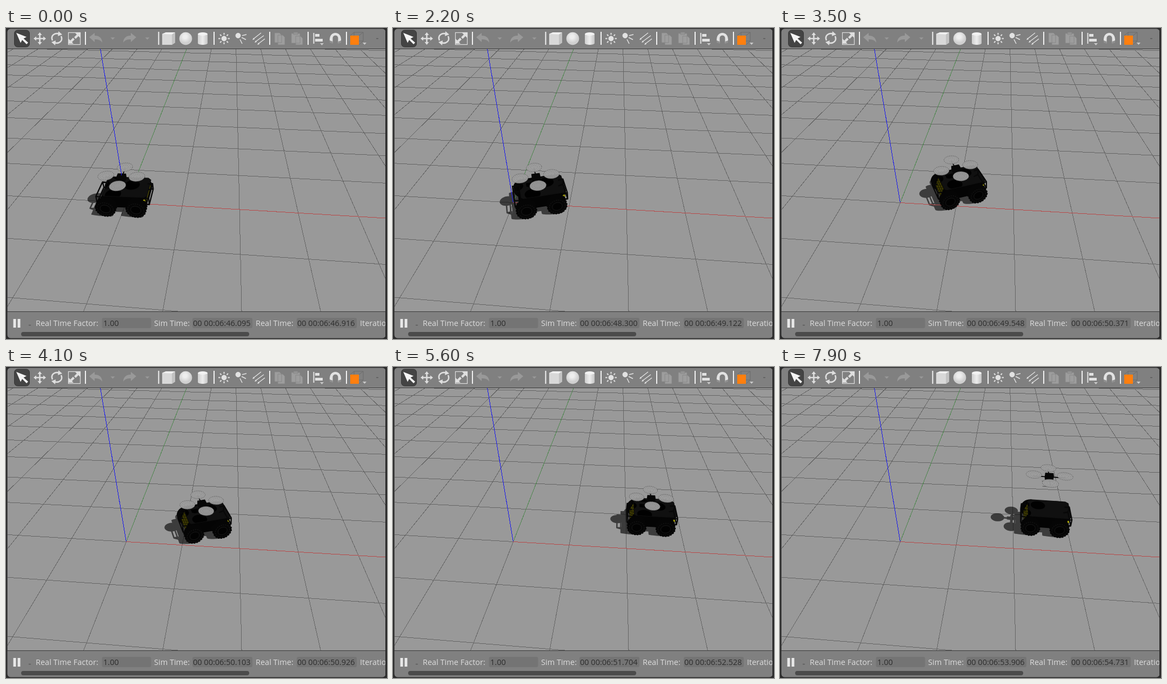
These frames come from a looping animation (705x574 px, 8000 ms). An HTML page:

```html
<!DOCTYPE html>
<html lang="en">
<head>
<meta charset="utf-8">
<title>Rover and drone simulation</title>
<style>
  html, body { margin: 0; width: 100%; height: 100%; overflow: hidden; background: #2b2b2b; }
  svg { display: block; width: 705px; height: 574px; }
  text { font: 14.5px "Open Sans", "Noto Sans", sans-serif; fill: #dcdcdc; white-space: pre; }
  .value { fill: #2d2d2d; }
</style>
</head>
<body>
<svg viewBox="0 0 705 574">
  <defs>
    <clipPath id="view"><rect x="3" y="39" width="699" height="484"/></clipPath>
    <clipPath id="deck"><path id="deckClip"/></clipPath>
    <radialGradient id="ball" cx=".45" cy=".35"><stop offset=".3" stop-color="#eee"/><stop offset="1" stop-color="#cfcfcf"/></radialGradient>
    <linearGradient id="tube"><stop offset="0" stop-color="#cfcfcf"/><stop offset=".5" stop-color="#ececec"/><stop offset="1" stop-color="#c4c4c4"/></linearGradient>
  </defs>

  <rect width="705" height="574" fill="#2b2b2b"/>
  <rect x="2.5" y="1.5" width="700" height="571" rx="6" fill="#808080"/>
  <rect x="3" y="39" width="699" height="484" fill="#999"/>
  <g id="scene" clip-path="url(#view)"></g>
  <path d="M2 38.5H703M2 523.5H703" stroke="#3a3a3a"/>

  <!-- toolbar -->
  <rect x="15.5" y="4" width="28" height="31" rx="6" fill="#444" stroke="#353535"/>
  <path d="M19 9L38 16.500L32.500 19.500L41 27L38 30L30 22L27 27.500Z" fill="#f4f4f4"/>
  <g fill="#dedede">
    <path d="M62.500 8l4 5h-2.700v5.200h5.200v-2.700l5 4-5 4v-2.700h-5.200v5.200h2.700l-4 5-4-5h2.700v-5.200h-5.200v2.700l-5-4 5-4v2.700h5.200v-5.200h-2.700z"/>
    <path d="M97 6l7 6-8 3zM91 32l-7-6 8-3z"/>
    <path d="M128 9h9v9l-3-3-5 5-3-3 5-5zM125 29h-9v-9l3 3 5-5 3 3-5 5z"/>
  </g>
  <g fill="none" stroke="#dedede" stroke-width="2">
    <path d="M86 23C82 14 90 8 99 11M102 15C106 24 98 30 89 27" stroke-width="2.600"/>
    <rect x="115.500" y="8.500" width="22" height="22" stroke-width="1.200"/>
  </g>
  <path d="M147 7V31M282.500 7V31M385 7V31M488 7V31M559 7V31M630 7V31" stroke="#f2f2f2" stroke-width="2"/>
  <g fill="#999">
    <path d="M154 17l10-8v5c8 0 14 4 14 13-3-5-7-6-14-6v5z"/>
    <path d="M241 17l-10-8v5c-8 0-14 4-14 13 3-5 7-6 14-6v5z"/>
    <path d="M193.500 17.500h8l-4 4zM257.500 17.500h8l-4 4z"/>
  </g>
  <path d="M289 11l7-3h17v19l-6 4h-18z" fill="#d8d8d8"/>
  <path d="M289 11l7-3h17l-6 4z" fill="#f0f0f0"/>
  <path d="M307 12l6-4v19l-6 4z" fill="#c2c2c2"/>
  <circle cx="332.500" cy="19.500" r="11.800" fill="url(#ball)"/>
  <path d="M355 11v17c0 4 18 4 18 0v-17z" fill="url(#tube)"/>
  <ellipse cx="364" cy="11" rx="9" ry="3" fill="#f2f2f2"/>
  <g fill="#e2e2e2" stroke="#e2e2e2">
    <circle cx="403.500" cy="19.500" r="4.500"/>
    <path id="rays" stroke-width="2" fill="none"/>
    <circle cx="429.500" cy="14" r="4.500"/>
    <path d="M437 14l8-2M436 17.500l8 4M433 21l4 8" stroke-width="1.500"/>
    <path d="M458 20L472 9M462 25L477 14M467 29L479 20" stroke-width="1.400"/>
    <path d="M456 22l2-4 2 3zM460 27l2-4 2 3zM465 31l2-4 2 3z" stroke="none"/>
  </g>
  <g fill="#9d9d9d" stroke="#838383" stroke-width=".8">
    <path d="M497 9h9l4 4v14h-13zM503 13h9l4 4v14h-13z"/>
    <path d="M528 10h16v18h-16zM532 8h8v4h-8zM536 15h9l4 4v12h-13z"/>
  </g>
  <g fill="#e2e2e2">
    <path d="M568.500 9h2v20h-2zM572 11h8v5h-8zM572 20h14v5h-14z"/>
    <path d="M581 28h7l-3.500 4zM660 27h7l-3.500 4z" opacity=".75"/>
    <path d="M599 24C597 4 622 4 620 24L614.500 28V19C614.500 12 604.500 12 604.500 19V28Z"/>
  </g>
  <path d="M599 23l5.500 2v4l-5.500-2zM620 23l-5.500 2v4l5.500-2z" fill="#8f8f8f"/>
  <path d="M637 14l7-6h17v16l-8 7M653 14l8-6M644 8v6M653 24h8" fill="none" stroke="#6a6a6a" stroke-width=".9"/>
  <rect x="637" y="14" width="16" height="17" fill="#ff7f0e"/>
  <path d="M685 19.500h4" stroke="#5a5a5a" stroke-width="1.500"/>

  <!-- status bar -->
  <path d="M13.500 537h5v16h-5zM21.500 537h5v16h-5z" fill="#e8e8e8"/>
  <path d="M42 548.500h4" stroke="#5a5a5a" stroke-width="1.500"/>
  <g fill="#747474">
    <rect x="177.500" y="535" width="91" height="19" rx="3"/>
    <rect x="345" y="535" width="111" height="19" rx="3"/>
    <rect x="538" y="535" width="111" height="19" rx="3"/>
  </g>
  <text x="55" y="550">Real Time Factor:</text>
  <text x="180" y="550" class="value">1.00</text>
  <text x="274" y="550">Sim Time:</text>
  <text x="346" y="550" class="value" id="sim"></text>
  <text x="462" y="550">Real Time:</text>
  <text x="539" y="550" class="value" id="real"></text>
  <text x="655" y="550">Iterations:</text>
  <rect x="28" y="561" width="422" height="8" rx="4" fill="#4b4b4b"/>
  <path d="M702 6V568h3V6z" fill="#2b2b2b"/>
</svg>
<script>
const $ = id => document.getElementById(id);
const LOOP = 8000;

// time, x, y, heading in degrees
const drive = [
  [300, .007, -.02, 2], [1200, .1, -.02, 2], [1600, .265, -.023, 2], [2100, .442, .007, 17],
  [2800, .695, .16, 29.9], [3000, .75, .193, 29.5], [3900, 1.205, .433, 22], [4100, 1.335, .482, 20.3],
  [4800, 1.96, .671, 14.5], [4900, 2.028, .69, 13.7], [5600, 2.432, .729, -.2],
  [5700, 2.485, .727, -.8], [6600, 2.561, .716, -1.85]
];
// time, simulated ms, lead of the real clock
const clock = [
  [0, 46095, 821], [200, 46195, 821], [300, 46195, 821], [1600, 47698, 821], [2800, 48901, 822],
  [4100, 50103, 823], [4900, 50903, 824], [5600, 51704, 824], [7000, 53106, 825], [7900, 53906, 825]
];

function sample(rows, t) {
  const i = rows.findIndex(r => r[0] >= t);
  if (i < 0) return rows[rows.length - 1];
  if (i === 0) return rows[0];
  const a = rows[i - 1], b = rows[i], u = (t - a[0]) / (b[0] - a[0]);
  return a.map((v, k) => v + (b[k] - v) * u);
}

// perspective camera, world metres to pixels
function project([x, y, z]) {
  const w = 1 - .01204 * x + .135 * y - .1024 * z;
  return [(222.5 + 99.57 * x + 56.84 * y - 36.1 * z) / w,
          (322.5 + 2.191 * x - 24.57 * y - 111.92 * z) / w];
}

// sunlight carries a point down to the given height
const cast = ([x, y, z], h = 0) => [x - .556 * (z - h), y + .111 * (z - h), h];

const line = pts => 'M' + pts.map(p => p[0].toFixed(2) + ' ' + p[1].toFixed(2)).join('L');
const poly = pts => line(pts) + 'Z';
const draw = pts => line(pts.map(project));
const fill = pts => poly(pts.map(project));

function hull(pts) {
  const sorted = [...pts].sort((a, b) => a[0] - b[0] || a[1] - b[1]);
  const half = list => {
    const out = [];
    for (const p of list) {
      while (out.length > 1) {
        const [a, b] = out.slice(-2);
        if ((b[0] - a[0]) * (p[1] - a[1]) - (b[1] - a[1]) * (p[0] - a[0]) > 0) break;
        out.pop();
      }
      out.push(p);
    }
    return out.slice(0, -1);
  };
  return half(sorted).concat(half(sorted.reverse()));
}
const solid = pts => poly(hull(pts.map(project)));
const shade = pts => solid(pts.map(p => cast(p)));

const ring = fn => Array.from({ length: 28 }, (_, i) => fn(Math.cos(i * Math.PI / 14), Math.sin(i * Math.PI / 14)));
const flatRing = (x, y, z, r) => ring((c, s) => [x + r * c, y + r * s, z]);
const wheelRing = (x, y, r) => ring((c, s) => [x + r * c, y, .165 + r * s]);
const box = (x0, x1, y0, y1, z0, z1) =>
  [x0, x1].flatMap(x => [y0, y1].flatMap(y => [z0, z1].map(z => [x, y, z])));

// local rover shapes
const DECK = .37, ROTOR = .57, ARM = .263;
const deck = [[-.31, -.22], [-.28, -.25], [.39, -.25], [.43, -.21], [.43, .22], [.38, .27], [-.26, .27], [-.31, .22]]
  .map(([x, y]) => [x, y, DECK]);
const bodyShape = deck.concat(box(-.36, .4, -.24, .24, .12, .25));
const wheel = (x, side) => wheelRing(x, side * .23, .165).concat(wheelRing(x, side * .342, .165));
const bumper = x => {
  const base = x < 0 ? -.34 : .38;
  return [[base, -.2, .3], [x, -.2, .31], [x, .2, .31], [base, .2, .3], [x, .2, .3], [x, .21, .19],
          [base, .2, .17], [x, .21, .18], [x, -.21, .18], [base, -.2, .17], [x, -.21, .19], [x, -.2, .31]];
};
const bumpers = [bumper(-.43), bumper(.46)];
const AXLES = [-.256, .256];

const scene = $('scene');
function layer(attrs) {
  const el = document.createElementNS('http://www.w3.org/2000/svg', 'path');
  for (const k in attrs) el.setAttribute(k, attrs[k]);
  scene.append(el);
  return d => el.setAttribute('d', d);
}
const stroke = (color, width, more) => layer({ fill: 'none', stroke: color, 'stroke-width': width, 'stroke-linejoin': 'round', ...more });
const crisp = (color, opacity) => stroke(color, 1, { 'stroke-opacity': opacity, 'shape-rendering': 'crispEdges' });

const paint = {
  shadow: layer({ fill: '#3c3c3c' }),
  shadowRods: stroke('#3c3c3c', 2.6),
  grid: crisp('#000', .34),
  red: crisp('#b84a4a', 1),
  green: crisp('#4c8a4c', .9),
  farWheels: layer({ fill: '#060606' }),
  body: layer({ fill: '#040404' }),
  deck: layer({ fill: '#101010', stroke: '#101010', 'stroke-width': 1.5, 'stroke-linejoin': 'round' }),
  deckShade: layer({ fill: '#010101', 'clip-path': 'url(#deck)' }),
  rear: layer({ fill: '#262402' }),
  rearTrim: stroke('#4e4a05', 1.3, { 'stroke-dasharray': '3 2' }),
  front: layer({ fill: '#56520a' }),
  badge: layer({ fill: '#a39d0a' }),
  bumpers: stroke('#080808', 2.3),
  wheels: layer({ fill: '#050505', stroke: '#050505', 'stroke-width': 2, 'stroke-dasharray': '3 2' }),
  tyres: stroke('#131313', 1.4, { 'stroke-dasharray': '2 2' }),
  rims: layer({ fill: '#020202', stroke: '#181818' }),
  skids: stroke('#4a4a4a', .9),
  arms: stroke('#080808', 1.8)
};
const disc = () => {
  const face = layer({ fill: '#9c9c9c', 'fill-opacity': .95, stroke: '#606060', 'stroke-width': .9, 'stroke-dasharray': '2 1.3' });
  const inner = stroke('#808080', .7, { 'stroke-dasharray': '1.5 2' });
  return (at, x, y, z) => {
    face(fill(flatRing(x, y, z, .132).map(at)));
    inner([.1, .06].map(r => fill(flatRing(x, y, z, r).map(at))).join(''));
  };
};
const discs = [disc(), disc(), disc()];
paint.hub = layer({ fill: '#070707' });
discs.push(disc());
paint.blue = crisp('#1818ee', 1);

// fixed scenery
const span = (a, b) => Array.from({ length: b - a + 1 }, (_, i) => a + i);
paint.grid(span(-10, 10).map(x => draw([[x, -3.5, 0], [x, 10, 0]])).join('') +
           span(-3, 10).map(y => draw([[-10, y, 0], [10, y, 0]])).join(''));
paint.red(draw([[0, 0, 0], [10, 0, 0]]));
paint.green(draw([[0, 0, 0], [0, 10, 0]]));
$('rays').setAttribute('d', span(0, 7).map(i => {
  const c = Math.cos(i * Math.PI / 4), s = Math.sin(i * Math.PI / 4);
  return line([[403.5 + 7 * c, 19.5 + 7 * s], [403.5 + 10.5 * c, 19.5 + 10.5 * s]]);
}).join(''));

function render(t) {
  const [, px, py, deg] = sample(drive, t);
  const c = Math.cos(deg * Math.PI / 180), s = Math.sin(deg * Math.PI / 180);
  const at = ([x, y, z]) => [px + x * c - y * s, py + x * s + y * c, z];
  const place = pts => pts.map(at);

  // drone, parked slightly off the rover's centre
  const lift = .47 * Math.pow(Math.max(0, t - 7100) / 800, 1.3);
  const z = ROTOR + lift, cx = -.02, cy = .04;
  const rotors = [[cx, cy + ARM], [cx - ARM, cy], [cx + ARM, cy], [cx, cy - ARM]];
  const arms = rotors.map(([x, y]) => place([[cx, cy, z - .03], [x, y, z - .03], [x, y, z]]));
  const hub = place(box(cx - .07, cx + .07, cy - .05, cy + .05, z - .065, z + .02));
  const rotorRings = rotors.map(([x, y]) => place(flatRing(x, y, z, .132)));
  rotors.forEach(([x, y], i) => discs[i](at, x, y, z));
  paint.arms(arms.map(draw).join(''));
  paint.hub(solid(hub));
  paint.skids(lift > .05
    ? [-.09, .09].map(y => draw(place([[cx - .1, cy + y, z - .17], [cx + .1, cy + y, z - .17]]))).join('') : '');

  // rover
  const near = AXLES.map(x => place(wheel(x, -1)));
  const far = AXLES.map(x => place(wheel(x, 1)));
  const body = place(bodyShape), top = fill(place(deck)), rods = bumpers.map(place);
  paint.farWheels(far.map(solid).join(''));
  paint.body(solid(body));
  paint.deck(top);
  $('deckClip').setAttribute('d', top);
  paint.deckShade(rotorRings.concat([hub]).map(r => solid(r.map(p => cast(p, DECK)))).join(''));
  paint.bumpers(rods.map(draw).join(''));
  paint.wheels(near.map(solid).join(''));
  paint.tyres(AXLES.map(x => fill(place(wheelRing(x, -.342, .135)))).join(''));
  paint.rims(AXLES.map(x => fill(place(wheelRing(x, -.342, .085)))).join(''));

  // end panels show only when they face the camera; the rear one slopes
  const facing = c * (1.64 - px) + s * (-4.33 - py);
  const slope = h => -.36 + (h - .25) * .42;
  const rear = facing < -.36;
  const rearLine = h => [[slope(h), -.17, h], [slope(h), .15, h]];
  paint.rear(rear ? fill(place([...rearLine(.2), ...rearLine(.35).reverse()])) : '');
  paint.rearTrim(rear ? [.23, .28, .33].map(h => draw(place(rearLine(h)))).join('') : '');
  paint.front(facing > .43
    ? fill(place([[.42, -.2, .25], [.42, .2, .25], [.42, .2, .29], [.42, -.2, .29]])) : '');
  paint.badge(fill(place([[.36, -.25, .28], [.41, -.25, .27], [.41, -.25, .32], [.38, -.25, .32]])));

  // shadows on the ground
  paint.shadow([body, hub, ...near, ...far, ...rotorRings].map(shade).join(''));
  paint.shadowRods(rods.concat(arms).map(r => draw(r.map(p => cast(p)))).join(''));

  // the vertical axis is hidden inside the rover
  const foot = px < .08 ? ROTOR + .03 : px < .42 ? DECK : 0;
  paint.blue(draw([[0, 0, foot], [0, 0, 4]]));

  const [, sim, lead] = sample(clock, t);
  const stamp = ms => '00 00:06:' + (Math.round(ms) / 1000).toFixed(3);
  $('sim').textContent = stamp(sim);
  $('real').textContent = stamp(Math.round(sim) + Math.round(lead));
}

// the picture advances every 100 ms, with a few held steps
function tick(now) {
  let t = Math.floor(now % LOOP / 100) * 100;
  if (t === 100 || t === 300 || t === 7100) t -= 100;
  render(t);
  requestAnimationFrame(tick);
}
tick(performance.now());
</script>
</body>
</html>
```
